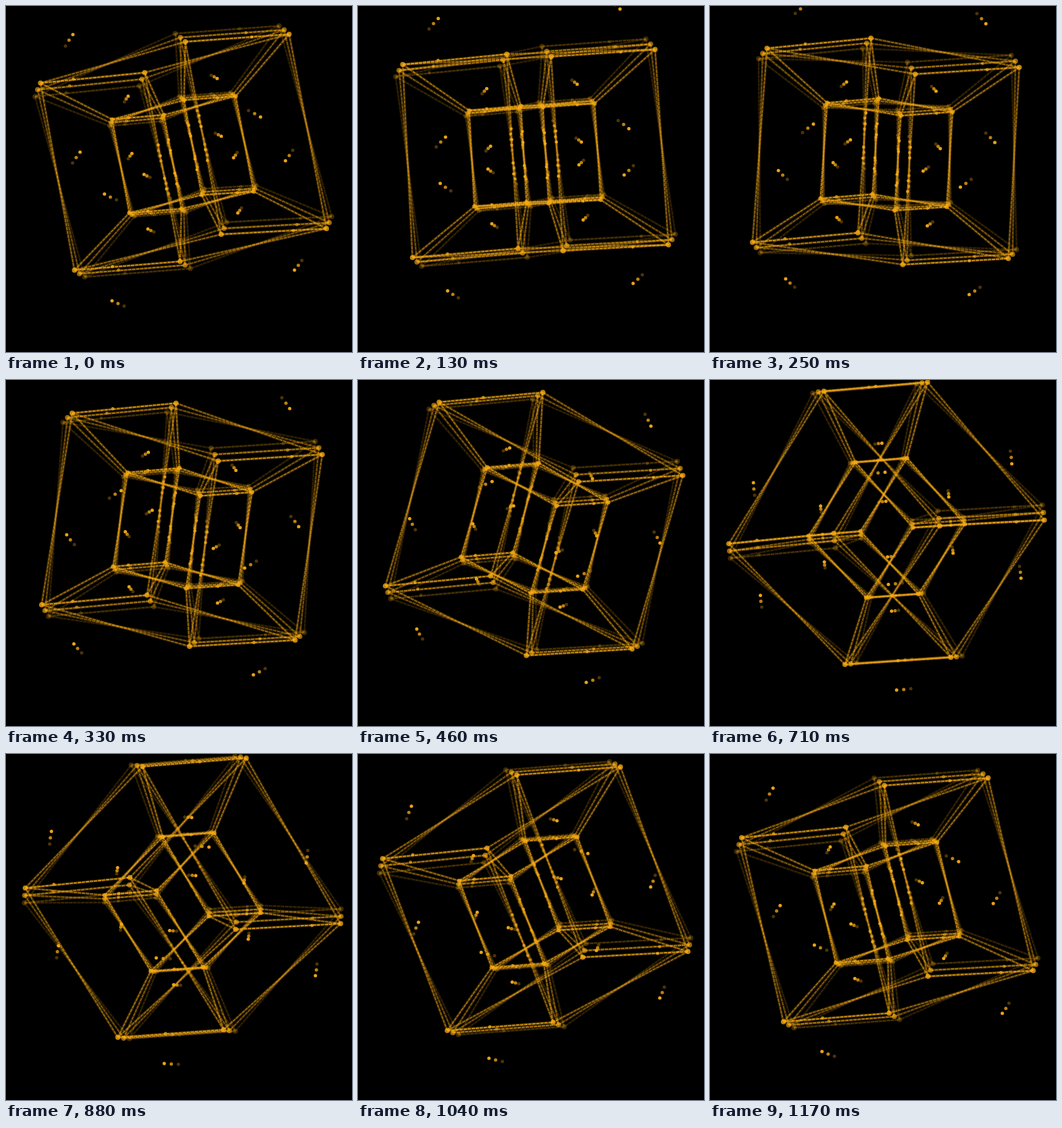
Recreate the animation shown at these times as an HTML page with a canvas. Size 512 by 512 pixels, loop 1210 ms.

```html
<!DOCTYPE html>
<html lang="en">
<head>
<meta charset="utf-8">
<title>Rotating hypercube</title>
<style>
html, body { margin: 0; width: 100%; height: 100%; overflow: hidden; background: #000; }
canvas { display: block; width: 100vw; height: 100vh; }
</style>
</head>
<body>
<canvas id="stage" width="512" height="512"></canvas>
<script>
const ctx = document.getElementById("stage").getContext("2d");
const LOOP = 1210, STEPS = 29, QUARTER = Math.PI / 2;
const START = -52.9 * Math.PI / 180;
const INNER = 0.495;
const TRAIL = [0.3, 0.75, 0.95];   // oldest exposure first

// Projected axes, as offsets from the centre
const AXIS = [77.5, -6];
const CUBE = { down: [16, 203], right: [156, -11] };
const SPARK = { down: [8, 167], right: [192, -13], lift: [6, 84] };
const MIDDLE = { down: CUBE.down, right: SPARK.right };

// Slight lens distortion around the centre of the stage
function lens(x, y) {
  return [261.5 + x + 5e-5 * x * y, 221 + y + 7e-5 * x * x - 2.1e-4 * y * y];
}

function orbit(shape, angle, scale, shift, side) {
  const c = -Math.cos(angle), s = Math.sin(angle);
  const at = i => scale * (shape.down[i] * c + shape.right[i] * s + shift[i] * side);
  return lens(at(0), at(1));
}

function dot([x, y], radius, alpha) {
  ctx.globalAlpha = alpha;
  ctx.beginPath();
  ctx.arc(x, y, radius, 0, 7);
  ctx.fill();
}

function line([x1, y1], [x2, y2], alpha) {
  ctx.beginPath();
  ctx.moveTo(x1, y1);
  ctx.lineTo(x2, y2);
  ctx.setLineDash([]);
  ctx.lineWidth = 4.2;
  ctx.globalAlpha = alpha * 0.25;
  ctx.stroke();
  ctx.setLineDash([5, 1]);
  ctx.lineWidth = 1.9;
  ctx.globalAlpha = alpha * 0.85;
  ctx.stroke();
}

const mix = (p, q, f) => [p[0] + (q[0] - p[0]) * f, p[1] + (q[1] - p[1]) * f];

function knots(p, q, scale, alpha) {
  for (const d of [-33, -17, 17, 33]) dot(mix(p, q, 0.5 + d / (284 * scale)), 2.3, alpha);
}

function drawPose(step, alpha) {
  let angle = START + QUARTER * step / STEPS;
  if (angle > 0) angle -= QUARTER;
  const upright = Math.max(0, Math.cos(2 * angle + QUARTER));
  const corner = (i, side, scale) => orbit(CUBE, angle + i * QUARTER, scale, AXIS, side);

  for (let i = 0; i < 4; i++) {
    for (const side of [-1, 1]) {
      line(corner(i, side, 1), corner(i, side, INNER), alpha * 0.7);
      for (const scale of [1, INNER]) {
        const here = corner(i, side, scale), next = corner(i + 1, side, scale);
        line(here, next, alpha * (scale === 1 ? 0.65 : 0.85));
        if (side < 0) line(here, corner(i, 1, scale), alpha);
        if (i === (side < 0 ? 1 : 3)) knots(here, next, scale, alpha * upright);
        dot(here, scale === 1 ? 3.8 : 3.2, alpha * 0.8);
        dot(orbit(SPARK, angle + i * QUARTER, scale, SPARK.lift, side), 2.5, alpha);
      }
    }
    for (const scale of [1, INNER]) {
      dot(orbit(MIDDLE, angle + i * QUARTER, scale, AXIS, 0), 2.4, alpha * 0.8);
    }
  }
}

function render(now) {
  // The picture changes on whole hundredths of a second
  const time = Math.floor(now % LOOP / 10) * 10;
  const step = Math.floor((time + 5) * STEPS / LOOP);
  ctx.globalAlpha = 1;
  ctx.fillStyle = "#000";
  ctx.fillRect(0, 0, 512, 512);
  ctx.fillStyle = ctx.strokeStyle = "#f8ac14";
  TRAIL.forEach((alpha, i) => drawPose(step + i - TRAIL.length + 1, alpha));
}

const begin = performance.now();
function tick() {
  render(performance.now() - begin);
  requestAnimationFrame(tick);
}
tick();
</script>
</body>
</html>
```
